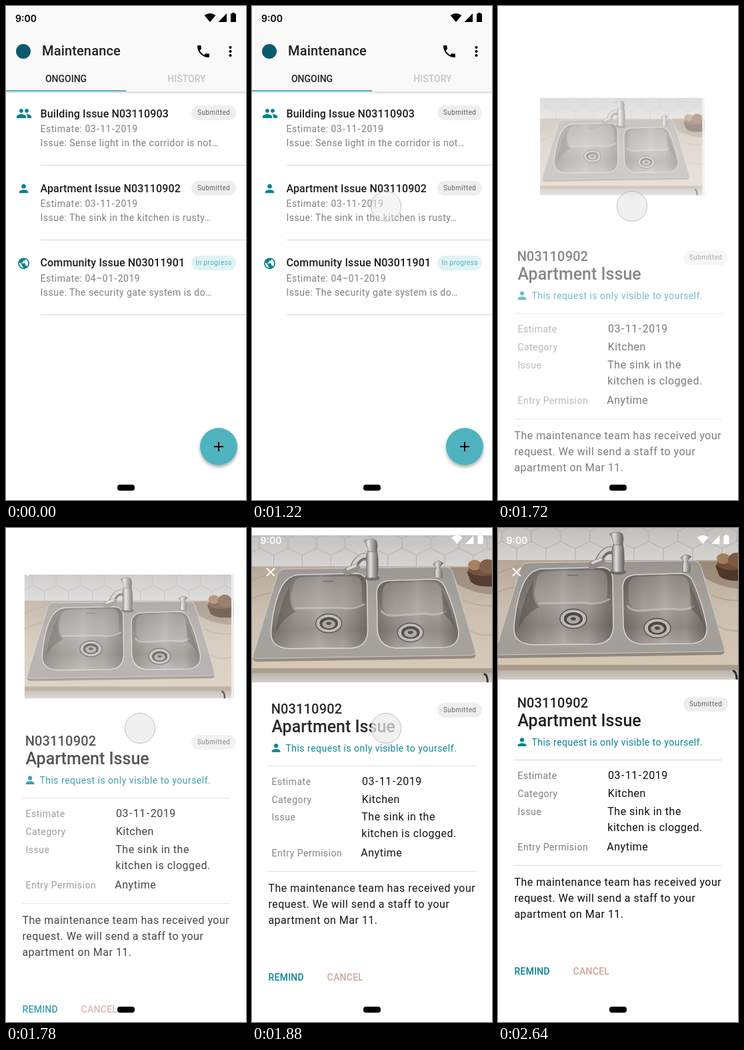
Recreate the animation shown at these times as an HTML page. Size 360 by 740 pixels, loop 3.72 s.

```html
<!DOCTYPE html>
<html lang="en">
<head>
<meta charset="utf-8">
<title>Maintenance</title>
<style>
  html, body { margin: 0; width: 100%; height: 100%; overflow: hidden; background: #fff; }
  svg { display: block; width: 100%; height: 100%; font-family: Roboto, sans-serif; }
  .clock { font: 600 14px Inter, sans-serif; }
  .title { font-size: 20px; font-weight: 500; letter-spacing: .15px; fill: #212121; }
  .tab { font-size: 14px; font-weight: 500; text-anchor: middle; }
  .row { font-size: 16px; font-weight: 500; letter-spacing: .15px; fill: #1c1c1c; }
  .small { font-size: 14px; letter-spacing: .5px; fill: #7f7f7f; }
  .note { font-size: 14px; letter-spacing: .5px; fill: #00838f; }
  .body { font-size: 16px; letter-spacing: .5px; fill: #0c0c0c; }
  .head { font-size: 25px; font-weight: 500; fill: #212121; }
  .action { font-size: 14px; font-weight: 500; letter-spacing: .25px; }
  .chip { font-size: 10px; letter-spacing: .4px; text-anchor: middle; }
  .rule { stroke: #d9d9d9; }
</style>
</head>
<body>
<svg id="stage" viewBox="0 0 360 740" xmlns="http://www.w3.org/2000/svg"></svg>
<script>
const LOOP = 3720;
const TEAL = '#00838f', AQUA = '#4fb3bf';

const ICON = {
  people: 'M16 11c1.66 0 2.99-1.34 2.99-3S17.66 5 16 5c-1.66 0-3 1.34-3 3s1.34 3 3 3zm-8 0c1.66 0 2.99-1.34 2.99-3S9.66 5 8 5C6.34 5 5 6.34 5 8s1.34 3 3 3zm0 2c-2.33 0-7 1.17-7 3.5V19h14v-2.5c0-2.33-4.67-3.5-7-3.5zm8 0c-.29 0-.62.02-.97.05 1.16.84 1.97 1.97 1.97 3.45V19h6v-2.5c0-2.33-4.67-3.5-7-3.5z',
  person: 'M12 12c2.21 0 4-1.79 4-4s-1.79-4-4-4-4 1.79-4 4 1.79 4 4 4zm0 2c-2.67 0-8 1.34-8 4v2h16v-2c0-2.66-5.33-4-8-4z',
  globe: 'M12 2C6.48 2 2 6.48 2 12s4.48 10 10 10 10-4.48 10-10S17.52 2 12 2zm-1 17.93c-3.95-.49-7-3.85-7-7.93 0-.62.08-1.21.21-1.79L9 15v1c0 1.1.9 2 2 2v1.93zm6.9-2.54c-.26-.81-1-1.39-1.9-1.39h-1v-3c0-.55-.45-1-1-1H8v-2h2c.55 0 1-.45 1-1V7h2c1.1 0 2-.9 2-2v-.41c2.93 1.19 5 4.06 5 7.41 0 2.08-.8 3.97-2.1 5.39z',
  phone: 'M6.62 10.79c1.44 2.83 3.76 5.14 6.59 6.59l2.2-2.2c.27-.27.67-.36 1.02-.24 1.12.37 2.33.57 3.57.57.55 0 1 .45 1 1V20c0 .55-.45 1-1 1-9.39 0-17-7.61-17-17 0-.55.45-1 1-1h3.5c.55 0 1 .45 1 1 0 1.25.2 2.45.57 3.57.11.35.03.74-.25 1.02l-2.2 2.2z'
};

// Dates are set with a little air around their hyphens.
const airy = s => s.replace(/-(\d)/g, '<tspan dx=".06em">-</tspan><tspan dx=".06em">$1</tspan>');
const text = (cls, x, y, s, fill) =>
  `<text class="${cls}" x="${x}" y="${y}"${fill ? ` style="fill:${fill}"` : ''}>${airy(s)}</text>`;
const icon = (name, x, y, scale = 1, fill = TEAL) =>
  `<path d="${ICON[name]}" fill="${fill}" transform="translate(${x} ${y}) scale(${scale})"/>`;
const rule = (x1, x2, y) => `<path class="rule" d="M${x1} ${y}H${x2}"/>`;
const chip = (y, label, bg = '#eee', ink = '#616161') =>
  `<rect x="278" y="${y}" width="67" height="22" rx="11" fill="${bg}"/>` + text('chip', 311.7, y + 14.3, label, ink);

const statusBar = (fill, shift) => `<g fill="${fill}">
  ${text('clock', 14 - shift, 24, '9:00')}
  <path transform="translate(${shift})" d="M297.5 14Q306 8 314.5 14L306 24ZM331 11V24H318.5ZM337 11.5H339.2V10H342.8V11.5H345V24H337Z"/></g>`;

const issue = (y, glyph, title, date, detail, tag) =>
  glyph + text('row', 51.5, y, title) + text('small', 51.5, date.y, 'Estimate: ' + date.s) +
  text('small', 51.5, date.y + 21, 'Issue: ' + detail) + tag;

const list = `
  <rect width="360" height="740" fill="#fff"/>
  <rect y="128" width="360" height="4" fill="url(#edge)"/>
  <rect width="360" height="128" fill="#f9f9f9"/>
  ${statusBar('#000', 0)}
  <circle cx="26" cy="68" r="11" fill="#0a5a6e"/>
  ${text('title', 54, 74, 'Maintenance')}
  ${icon('phone', 284, 56, 1, '#000')}
  ${[62, 68, 74].map(y => `<circle cx="336.5" cy="${y}" r="2.1"/>`).join('')}
  ${text('tab', 90, 114, 'ONGOING', '#212121')}
  ${text('tab', 271, 114, 'HISTORY', '#c4c4c4')}
  <rect y="126" width="180" height="2" fill="${AQUA}"/>
  ${[238.5, 350.5, 462.5].map(y => rule(52, 360, y)).join('')}
  ${issue(167, icon('people', 15, 149), 'Building Issue N03110903', { y: 189, s: '03-11-2019' },
    'Sense light in the corridor is not…', chip(149, 'Submitted'))}
  ${issue(279, icon('person', 16.5, 263.5, .84), 'Apartment Issue N03110902', { y: 301, s: '03-11-2019' },
    'The sink in the kitchen is rusty…', chip(262, 'Submitted'))}
  ${issue(390, icon('globe', 16.5, 375.5, .84), 'Community Issue N03011901', { y: 413, s: '04–01-2019' },
    'The security gate system is do…', chip(374, 'In progress', '#e0f2f4', AQUA))}
  <rect id="press" y="240" width="360" height="112" fill="#000" opacity=".06"/>
  <circle cx="319" cy="660" r="28" fill="${AQUA}" filter="url(#lift)"/>
  <path d="M312 660h14M319 653v14" stroke="#000" stroke-width="2"/>`;

const ellipse = (x, y, rx, ry, fill, more = '') =>
  `<ellipse cx="${x}" cy="${y}" rx="${rx}" ry="${ry}" fill="${fill}" ${more}/>`;
const drain = (x, y) =>
  ellipse(x, y, 20, 14.5, '#b9b6b3', 'stroke="#55504c" stroke-width="1.5"') +
  ellipse(x, y, 15, 10.5, '#4d4946', 'stroke="#dedcda"') +
  ellipse(x, y + 1, 10, 6.5, '#aaa7a4') + ellipse(x, y, 4, 2.5, '#504c49');
const bowl = d => ['bowl', 'sides'].map(id => `<path d="${d}" fill="url(#${id})"/>`).join('') +
  `<path d="${d}" fill="none" stroke="#d6d3d0" stroke-width="1.6"/>`;

const photo = `<g clip-path="url(#frame)">
  <rect x="-9" width="384" height="49" fill="url(#wall)"/>
  <rect x="-9" width="384" height="49" fill="url(#tiles)"/>
  <rect x="-9" y="48" width="384" height="145" fill="url(#stone)"/>
  <path d="M-9 72Q15 60 40 55M-9 100Q10 90 30 88M320 100Q345 112 375 108M328 145Q350 160 375 150" fill="none" stroke="#a89884" stroke-width="2" opacity=".5"/>
  <path d="M300 50H375V92Q340 92 312 76Z" fill="#6d5b4c" opacity=".4"/>
  <rect x="-9" y="192" width="384" height="14" fill="#d5c6b3"/>
  <rect x="-9" y="205" width="384" height="8" fill="#aa9c8b"/>
  <rect x="-9" y="213" width="384" height="14" fill="url(#door)"/>
  <path d="M352 214q6 0 6 13" fill="none" stroke="#2f2a27" stroke-width="3"/>
  <path d="M-4 189L34 62Q37 53 48 53L292 50Q301 50 304 58L339 183Q341 190 332 190L4 195Q-5 195-4 189Z" fill="#5c544d" opacity=".55"/>
  <path d="M-4 186L34 60Q37 52 48 52L292 49Q301 49 304 57L339 178Q341 185 332 185L4 190Q-5 190-4 186Z" fill="url(#steel)" stroke="#cfccc9"/>
  ${bowl('M66 61L154 59Q172 59 172 78L173 146Q173 172 148 174L54 175Q22 174 24 148Q27 108 38 84Q47 63 66 61Z')}
  <path d="M62 112Q50 106 58 78Q60 66 70 65L152 63Q163 64 164 78V106Q150 114 130 111Z" fill="#c9c5c1" opacity=".28"/>
  <path d="M60 113L130 112Q152 116 168 106" fill="none" stroke="#d9d6d3" stroke-width="3" opacity=".5"/>
  <path d="M30 152Q36 110 53 78Q50 112 62 118Q40 130 30 152Z" fill="#4a4541" opacity=".45"/>
  ${bowl('M207 70L272 68Q288 68 293 82Q306 110 313 146Q316 170 292 173L216 174Q190 172 188 146L187 88Q188 71 207 70Z')}
  <path d="M196 108V86Q197 74 208 73L272 71Q284 72 287 84L294 118Q276 124 262 120L212 123Q197 122 196 108Z" fill="#c9c5c1" opacity=".24"/>
  <path d="M194 116Q198 124 212 124L262 121Q280 125 295 117" fill="none" stroke="#d9d6d3" stroke-width="3" opacity=".5"/>
  <path d="M287 84Q304 116 309 148Q304 132 290 122Z" fill="#4a4541" opacity=".45"/>
  ${drain(113, 136)}${drain(239, 150)}
  <path d="M104 71h16" stroke="#5e5955"/>
  ${ellipse(180, 66, 12, 4, '#6b6763')}
  <path d="M177 36Q160 26 149 54" fill="none" stroke="#6f6b67" stroke-width="11"/>
  <path d="M177 34Q160 24 148 53" fill="none" stroke="#cfccca" stroke-width="6"/>
  <path d="M155 50L141 56" stroke="#8f8b88" stroke-width="12" stroke-linecap="round"/>
  <path d="M154 47L142 52" stroke="#d5d3d1" stroke-width="4" stroke-linecap="round"/>
  <path d="M172 66L171 40Q170 28 175 23H187Q191 38 188 66Z" fill="url(#chrome)" stroke="#6b6763" stroke-width=".7"/>
  <path d="M174 25Q173 15 167 9Q176 4 186 8Q190 16 186 26Z" fill="url(#chrome)" stroke="#6b6763" stroke-width=".7"/>
  <path d="M277 66V55L279 50L274 45Q277 40 284 40L290 43L285 48L284 51L288 56V66Z" fill="url(#chrome)" stroke="#6b6763" stroke-width=".7"/>
  <path d="M326 56L375 50V78Q343 82 332 72Z" fill="#4f3728"/>
  ${ellipse(352, 54, 24, 9, '#6d4e39')}
  ${ellipse(338, 46, 10, 8, '#a27d5b')}
  ${ellipse(358, 48, 13, 11, '#7b5a42')}
  <rect x="370" width="5" height="227" fill="#eceae8"/></g>`;

const field = (y, label, value, x) => text('small', 29.5, y, label) + text('body', x, y, value);

const detail = `
  <g id="photo">${photo}</g>
  <g id="sheet">
    ${text('title', 28.7, 269, 'N03110902')}${chip(253, 'Submitted')}
    ${text('head', 29.5, 297, 'Apartment Issue')}
    ${icon('person', 26.5, 311, .8)}
    ${text('note', 50.4, 326, 'This request is only visible to yourself.')}
    ${rule(24, 336, 347.5)}
    ${field(376, 'Estimate', '03-11-2019', 165)}
    ${field(403, 'Category', 'Kitchen', 164.7)}
    ${field(429.5, 'Issue', 'The sink in the', 164.3)}
    ${text('body', 164.3, 454, 'kitchen is clogged.')}
    ${field(483, 'Entry Permision', 'Anytime', 163.3)}
    ${rule(24, 336, 505.5)}
    ${['The maintenance team has received your', 'request. We will send a staff to your', 'apartment on Mar 11.']
      .map((s, i) => text('body', 24.4, 536 + 24 * i, s)).join('')}
    ${text('action', 24.5, 669, 'REMIND', TEAL)}
    ${text('action', 112.6, 669, 'CANCEL', '#cfa498')}
  </g>
  ${statusBar('#fff', 1.5)}
  <path d="M22 60l12 12M34 60l-12 12" stroke="#fff" stroke-width="2"/>`;

const stops = colors => colors.map((c, i) =>
  `<stop offset="${i / (colors.length - 1)}" stop-color="${c}"/>`).join('');
const down = (id, ...colors) => `<linearGradient id="${id}" x2="0" y2="1">${stops(colors)}</linearGradient>`;
const across = (id, ...colors) => `<linearGradient id="${id}">${stops(colors)}</linearGradient>`;

document.getElementById('stage').innerHTML = `<defs>
  ${down('edge', 'rgba(0,0,0,.16)', 'rgba(0,0,0,0)')}
  ${down('wall', '#c2c0bf', '#d6d4d3')}
  ${down('stone', '#b5a695', '#ccbeae', '#d3c6b6')}
  ${down('door', '#b8b1a8', '#d2cdc6')}
  ${down('steel', '#98948f', '#a5a19d', '#a19d99')}
  ${down('bowl', '#736e6a', '#8b8682', '#9d9893', '#8d8883', '#a7a29d')}
  ${across('sides', 'rgba(45,40,36,.35)', 'rgba(45,40,36,.05)', 'rgba(255,255,255,.12)', 'rgba(45,40,36,0)', 'rgba(45,40,36,.4)')}
  ${across('chrome', '#77736f', '#e2e0de', '#9b9794', '#5f5b58')}
  <pattern id="tiles" x="6" width="44" height="50" patternUnits="userSpaceOnUse">
    <path d="M0 5L22 -6L44 5V20L22 31L0 20ZM22 31V50" fill="none" stroke="#aeabaa"/>
  </pattern>
  <clipPath id="frame"><rect x="-8.6" width="383" height="227"/></clipPath>
  <filter id="lift" x="-30%" y="-30%" width="160%" height="170%">
    <feDropShadow dx="0" dy="3" stdDeviation="2.5" flood-opacity=".32"/>
  </filter></defs>
  <rect width="360" height="740" fill="#fff"/>
  <g id="list">${list}</g>
  <g id="detail">${detail}</g>
  <rect x="167" y="717" width="26" height="9" rx="4"/>
  <circle id="cursor" r="22.5" fill="#ebebeb" stroke="#888" stroke-opacity=".5"/>`;

const el = Object.fromEntries(['list', 'press', 'detail', 'photo', 'sheet', 'cursor']
  .map(id => [id, document.getElementById(id)]));

const span = (t, start, length) => Math.min(1, Math.max(0, (t - start) / length));
const easeOut = u => 1 - (1 - u) ** 2;
const easeInOut = u => u < .5 ? 4 * u ** 3 : 1 - 4 * (1 - u) ** 3;
const show = (node, on) => node.setAttribute('display', on ? 'inline' : 'none');

const AWAY = [340, -60], REST = [188, 252], TAP = [201, 300];
const moves = [
  [343, 210, REST, easeOut],
  [770, 450, TAP, easeInOut],
  [2490, 210, AWAY, easeOut]
];

function cursorAt(t) {
  let pos = AWAY;
  for (const [start, length, goal, ease] of moves) {
    const k = ease(span(t, start, length));
    pos = pos.map((v, i) => v + (goal[i] - v) * k);
  }
  return pos;
}

function draw(t) {
  const opened = t >= 1640;
  show(el.list, !opened);
  show(el.detail, opened);
  show(el.press, t >= 1420);

  const left = (1 - span(t, 1630, 340)) ** 2.48;
  el.detail.setAttribute('opacity', 1 - left);
  el.sheet.setAttribute('transform', `translate(0 ${245 * left})`);
  el.photo.setAttribute('transform',
    `translate(${155.8 * left - 8.6} ${298 * left}) scale(${1 - .775 * left}) translate(8.6 0)`);

  const pressed = t >= 1420 && t < 1900;
  el.cursor.setAttribute('fill-opacity', pressed ? .72 : .5);
  el.cursor.setAttribute('transform', `translate(${cursorAt(t).join(' ')})`);
}

const begin = performance.now();
function tick() {
  draw((performance.now() - begin) % LOOP);
  requestAnimationFrame(tick);
}
tick();
</script>
</body>
</html>
```
